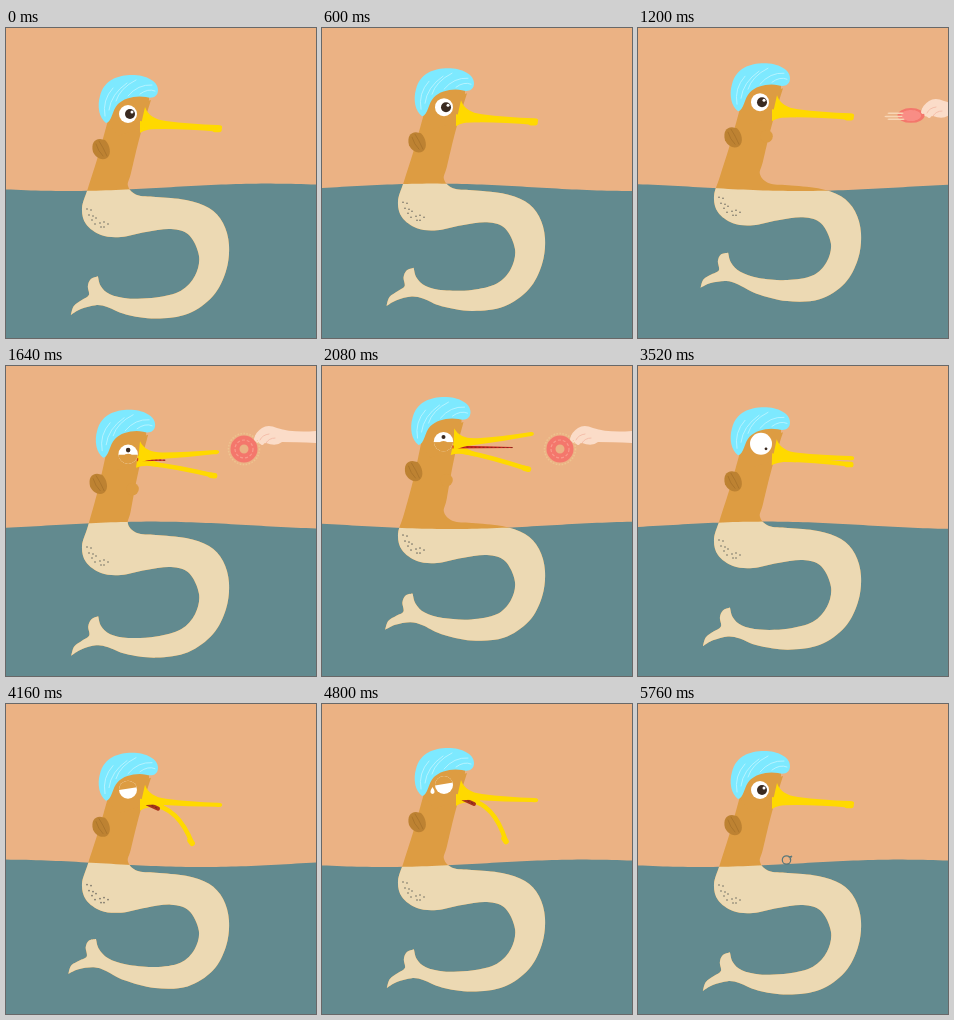
Animation of 310x310 px, one loop 5.8 s. Source, as an HTML page with a canvas:

```html
<!DOCTYPE html>
<html lang="en">
<head>
<meta charset="utf-8">
<title>Bathing bird</title>
<style>
html, body { margin: 0; width: 100%; height: 100%; overflow: hidden; background: #ebb284; }
canvas { display: block; }
</style>
</head>
<body>
<canvas id="stage" width="310" height="310"></canvas>
<script>
const g = document.getElementById('stage').getContext('2d');
const LOOP = 5800, STEP = 40, TAU = Math.PI * 2;
const SKIN = '#dd9c42', CREAM = '#ecd9b3', BEAK = '#ffd900', INK = '#3a2a20';
const clamp = v => Math.max(0, Math.min(1, v));
const rad = deg => deg * Math.PI / 180;

// Eased value from time/value pairs.
function key(t, ...k) {
  if (t <= k[0]) return k[1];
  for (let i = 2; i < k.length; i += 2) {
    if (t < k[i]) {
      const u = (t - k[i - 2]) / (k[i] - k[i - 2]);
      return k[i - 1] + (k[i + 1] - k[i - 1]) * u * u * (3 - 2 * u);
    }
  }
  return k[k.length - 1];
}

function fill(shape, color) {
  g.fillStyle = color;
  g.fill(typeof shape === 'string' ? new Path2D(shape) : shape);
}
function stroke(shape, color, width, dash = []) {
  g.strokeStyle = color;
  g.lineWidth = width;
  g.lineCap = dash.length ? 'butt' : 'round';
  g.setLineDash(dash);
  g.stroke(typeof shape === 'string' ? new Path2D(shape) : shape);
  g.setLineDash([]);
}
function oval(x, y, rx, ry, color, turn = 0) {
  const p = new Path2D();
  p.ellipse(x, y, rx, ry, turn, 0, TAU);
  fill(p, color);
}
function group(x, y, turn, draw) {
  g.save();
  g.translate(x, y);
  g.rotate(rad(turn));
  draw();
  g.restore();
}

// Body outline: three smooth runs that meet at the sharp fluke tips.
const INNER = [[104,85],[93,125],[82,160],[76,180],[80,196],[95,207],[115,209],[140,204],[165,201],
  [183,207],[193,228],[189,248],[175,263],[150,270],[122,271],[104,267],[95,259],[92,249]];
const FLUKE = [[92,249],[85,252],[82,259],[83,268],[76,273],[68,279],[65,288]];
const OUTER = [[65,288],[75,282],[90,278],[102,280],[120,287],[150,291],[182,286],[207,268],[220,243],
  [223,217],[217,195],[203,180],[180,172],[150,169],[131,167],[122,158],[125,145],[134,108],[145,72]];
const SPOTS = [[81,181],[85,182],[83,187],[87,188],[86,192],[90,190],[89,196],[94,195],[98,194],[98,199],[102,196],[95,199]];

function bodyPath(tail, hx, hy) {
  const path = new Path2D();
  const bend = ([x, y]) => {
    const w = Math.pow(clamp((225 - x) / 160), 1.3) * clamp((y - 210) / 40);
    const n = clamp((150 - y) / 70);
    return [x + .15 * w * tail + n * hx, y + w * tail + n * hy];
  };
  [INNER, FLUKE, OUTER].forEach((run, r) => {
    const p = run.map(bend);
    if (!r) path.moveTo(...p[0]);
    for (let i = 0; i < p.length - 1; i++) {
      const a = p[i - 1] || p[i], b = p[i], c = p[i + 1], d = p[i + 2] || c;
      path.bezierCurveTo(b[0] + (c[0] - a[0]) / 6, b[1] + (c[1] - a[1]) / 6,
        c[0] - (d[0] - b[0]) / 6, c[1] - (d[1] - b[1]) / 6, c[0], c[1]);
    }
  });
  path.closePath();
  return path;
}

function waterPath(t) {
  const path = new Path2D();
  path.moveTo(0, 310);
  for (let x = 0; x <= 310; x += 5) {
    path.lineTo(x, 159.3 + 3.7 * Math.cos(TAU * ((x - 62) / 400 - t / 960)));
  }
  path.lineTo(310, 310);
  return path;
}

function eye(t) {
  let x = 122, y = 86, r = 9, px = 2, py = 0, pr = 5, lower = 0, upper = 0, tilt = 0;
  if (t >= 1450 && t < 3080) {
    x = 125; y = 91.5; r = 9.7; px = 0;
    lower = key(t, 1450, 0, 1600, 1);
    py = key(t, 1450, -2, 1700, -4.5, 2500, -4.5, 2750, -7.5);
    pr = key(t, 1450, 4, 1700, 2, 2500, 2, 2750, 1.4);
    tilt = key(t, 2300, 0, 2700, -10);
  } else if (t >= 3080 && t < 3760) {
    x = 123; y = 83.5; r = key(t, 3080, 9, 3240, 11);
    px = 5; py = 5; pr = 1.4;
  } else if (t >= 3760 && t < 5240) {
    y = 84;
    upper = key(t, 3760, 0, 4000, 1, 5080, 1, 5240, 0);
    tilt = -9; pr = 0;
  }
  group(x, y, 0, () => {
    const ball = new Path2D();
    ball.arc(0, 0, r, 0, TAU);
    fill(ball, '#fff');
    g.clip(ball);
    if (pr) oval(px, py, pr, pr, INK);
    if (pr > 3) oval(px + 2, py - 2, 1.5, 1.5, '#fff');
    g.rotate(rad(tilt));
    g.fillStyle = SKIN;
    if (lower) {
      g.fillRect(-15, 12 - 11.5 * lower, 30, 20);
      oval(0, 12 - 11 * lower, 3.5, 1.6, SKIN);
    }
    if (upper) g.fillRect(-15, -33 + 12 * upper, 30, 20);
  });
  if (t > 4480 && t < 5120) {
    const y = key(t, 4480, 86, 4800, 90, 5120, 99);
    fill(`M110.5 ${y - 4}q4 6 0 7q-4 -1 0 -7`, '#fff');
  }
}

function beak(t) {
  const up = key(t, 1400, 0, 1800, -11, 2400, -11, 2900, -13, 3240, -1, 3560, -1, 3720, 0);
  const low = key(t, 1400, 0, 1800, 13, 2400, 13, 2900, 17, 3240, 2, 3560, 2, 3720, 0);
  const droop = key(t, 3760, 0, 4240, 1, 5000, 1, 5360, 0);
  const reach = key(t, 1500, 0, 1800, 58, 2240, 58, 2520, 112, 2960, 112, 3240, 0);

  group(134, 97, low, () => {
    const tx = 79 - 29 * droop, ty = 4.5 + 39 * droop;
    fill('M0 -4L0 8Q8 3 24 4L24 0Z', BEAK);
    stroke(`M12 2Q${40 - 2 * droop} ${1 + 4 * droop} ${tx} ${ty}`, BEAK, 4.5);
    stroke(`M${tx - 4 + 2 * droop} ${ty - 3 * droop}L${tx} ${ty}`, BEAK, 5.5);
  });
  if (droop > .4) {
    stroke('M141 98L152 103', '#a8341c', 4);
    stroke('M142 98L152 103', '#6e2a18', 1, [2, 2]);
  }
  if (reach > 1) {
    const tip = 136 + reach, long = clamp((reach - 58) / 50);
    fill(`M134 95.5L${tip} ${97 - long}L${tip} ${98 + long}L134 98.5Z`, '#cc2420');
    stroke(`M136 97L${tip} 97.5`, '#8a2a1c', 1, [2, 2]);
    if (t >= 2520) curl(tip + 8, 106, clamp(reach / 100));
  }
  group(134, 96, up, () => {
    fill('M5 -17Q9 -5 26 -3Q50 0 78 1Q83 1 82 4Q81 6 76 5Q48 5 20 3Q8 2 0 5Z', BEAK);
  });
}

// Snack wrapped in the coiled tongue.
function curl(x, y, size) {
  group(x, y, -13, () => {
    g.scale(size, size);
    const coils = 'M-10 9L12 9M-8 3L9 3M-5 -3L7 -3M-3 -9L3 -8';
    stroke(coils, '#d92a26', 7);
    stroke(coils, '#5d3d20', 1.4, [2, 2]);
    stroke('M-13 6L13 6M-10 0L10 0M-6 -6L6 -6', '#7c2f1c', 1.2, [3, 1.5]);
  });
}

function head(t, hx, hy) {
  group(hx, hy, 0, () => {
    fill('M103 96L106 68L143 62L143 72L138 100L112 108Z', SKIN);
    fill('M94 111C88 111 85 116 87 124C90 130 96 133 101 130C106 126 104 117 99 112Z', '#bd8232');
    stroke('M93 113Q97 119 101 128M90 116Q92 123 97 128', '#a8712a', .8);
    eye(t);
    beak(t);
    fill('M100 95C93 90 91 78 94 68C98 52 112 47 126 47C140 47 152 53 152 62C152 69 146 71 140 69C130 67 118 70 112 76C106 82 106 94 100 95Z', '#7de9ff');
    stroke('M99 88Q96 72 107 60M103 82Q105 66 121 55M110 73Q114 60 130 52M122 68Q132 56 146 57M134 66Q142 60 149 63', '#c4f5ff', .8);
  });
}

function donut(x, y, rush) {
  group(x, y, 0, () => {
    g.scale(1, 1 - .45 * rush);
    const ring = new Path2D();
    ring.arc(0, 0, 9, 0, TAU);
    if (rush < .5) {
      const glow = new Path2D();
      glow.arc(0, 0, 15.5, 0, TAU);
      stroke(glow, '#edc48f', 1.5, [1.5, 1.5]);
    }
    stroke(ring, '#f4776c', 9);
    stroke(ring, '#f99a8c', 1.2, [3, 2]);
    if (rush > .3) {
      oval(0, 0, 10, 10, '#f98d85');
      stroke('M-22 -4L-9 -4M-25 2L-10 2M-22 7L-8 7', '#f8d6b5', 3);
    }
  });
}

function hand(t) {
  const flesh = '#fbdcc8';
  if (t >= 1000 && t < 2560) {
    const dx = key(t, 1000, 90, 1200, 35, 1480, 0), dy = key(t, 1200, 11, 1480, 0);
    const rush = key(t, 1200, 1, 1440, 0);
    group(dx, dy, 0, () => {
      fill('M380 64L310 65Q286 67 271 62Q262 58 256 62Q247 68 249 75Q252 79 260 77Q270 81 276 76Q290 76 310 77L380 78Z', flesh);
    });
    if (t < 2520) donut(238 + dx, 83 + dy * .4, rush);
    group(dx, dy, 0, () => {
      stroke('M262 65Q252 66 250 73M268 69Q259 69 256 77', flesh, 4);
      stroke('M263 68Q256 69 254 74M269 72Q263 72 260 77', '#f3b7a2', .8);
    });
  } else if (t >= 2560 && t < 3120) {
    group(key(t, 2560, -16, 2880, 0, 3120, 60), key(t, 2560, -28, 2800, 0), 0, () => {
      fill('M267 109Q272 105 280 103Q292 99 310 100L380 98L380 110L310 107Q292 111 270 111Z', flesh);
      stroke('M271 108L284 106M274 105L286 103', '#f3c3ab', .8);
    });
  }
}

function bubble(t) {
  if (t < 5600) return;
  const y = 156 + (5760 - t) * .1, ring = new Path2D();
  ring.arc(148.5, y, 4.2, 0, TAU);
  stroke(ring, '#58777a', 1.2);
  stroke(`M151 ${y - 3}L154 ${y - 4}L152 ${y - 1}`, '#58777a', 1);
}

function draw(t) {
  const bob = -6 + 6 * Math.cos(TAU * 7 * t / 5760);
  const tail = -6.5 + 11.3 * Math.cos(TAU * (t / 960 - .83));
  const hx = key(t, 1350, 0, 1750, -3.5, 2950, -3.5, 3250, 0);
  const hy = key(t, 1350, 0, 1750, -4, 2200, -4, 2900, -3, 3300, .5, 3700, 2, 4500, 2, 4800, 0, 5200, 1, 5700, 0);
  const water = waterPath(t), body = bodyPath(tail, hx, hy);

  g.fillStyle = '#ebb284';
  g.fillRect(0, 0, 310, 310);
  fill(water, '#628a8f');

  const gulp = key(t, 700, 0, 900, 1, 2240, 1, 2480, 0);
  const lump = key(t, 1200, 0, 2080, 1);
  group(0, bob, 0, () => {
    fill(body, SKIN);
    if (gulp) oval(128.5 - 4 * lump, 120 + 6 * lump, 6.3 * gulp, 6.3 * gulp, SKIN);
  });
  g.save();
  g.clip(water);
  group(0, bob, 0, () => fill(body, CREAM));
  g.restore();
  group(0, bob, 0, () => SPOTS.forEach(([x, y]) => oval(x, y, .8, .8, '#6f6b62')));

  hand(t);
  group(0, bob, 0, () => head(t, hx, hy));
  bubble(t);
}

function tick() {
  draw(Math.floor(performance.now() % LOOP / STEP) * STEP);
  requestAnimationFrame(tick);
}
tick();
</script>
</body>
</html>
```
